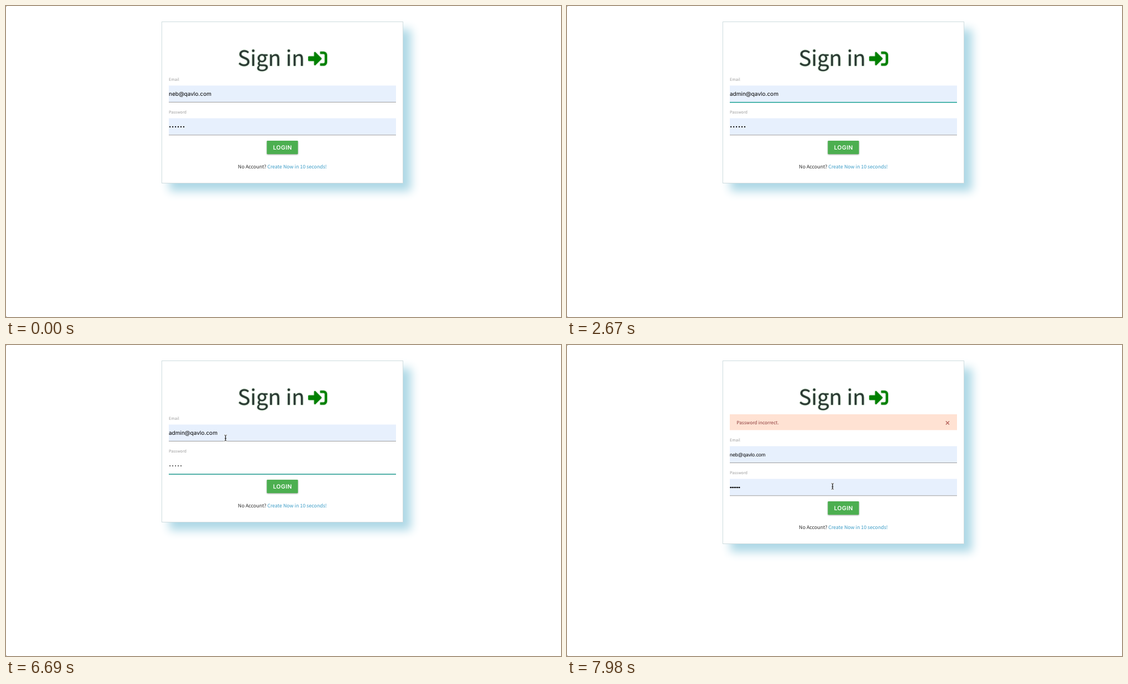
These frames come from a looping animation (999 by 561 pixels, 8 s). An HTML page:

```html
<!DOCTYPE html>
<html lang="en">
<head>
<meta charset="utf-8">
<title>Sign in</title>
<style>
  html, body { margin: 0; width: 100%; height: 100%; overflow: hidden; background: #fff; }
  #card {
    position: absolute; left: 280px; top: 28px; width: 435px; height: 292px;
    box-sizing: border-box; border: 1px solid #cfdcdf; background: #fff;
    box-shadow: 13.5px 13.5px 16px lightblue;
  }
  svg { position: absolute; left: 0; top: 0; display: block; }
  text {
    font-family: "Noto Sans CJK JP", "Noto Sans CJK SC", "Noto Sans CJK", "Open Sans", sans-serif;
    text-rendering: geometricPrecision;
  }
  .ui { font-family: Inter, Roboto, sans-serif; font-size: 8.5px; }
  .title { filter: drop-shadow(.8px .8px .9px rgba(0, 110, 0, .5)); }
  .label { font-size: 7.15px; fill: #9e9e9e; }
  .value { font-family: Inter, Roboto, sans-serif; font-size: 10.03px; }
  .value.plain { font-family: "Liberation Sans", Arial, sans-serif; font-size: 8.87px; }
  .foot { font-size: 8.8px; fill: #2b2b2b; }
  .panel { filter: drop-shadow(0 .7px 1.3px rgba(0, 0, 0, .38)); }
  .grey { fill: #5f6368; }
</style>
</head>
<body>
<div id="card"></div>
<svg width="999" height="561" viewBox="0 0 999 561">
  <path d="M0 0h1v1h-1zM0 560h1v1h-1z" fill="#777"/>

  <g class="title">
    <text x="477.3" y="108" font-size="38.2" text-anchor="middle" fill="#2a3733">Sign in</text>
    <g transform="translate(544 78) scale(.0664)">
      <path d="M324 96h92a64 64 0 0 1 64 64v192a64 64 0 0 1-64 64h-92" fill="none" stroke="green" stroke-width="64"/>
      <path d="M20 212H180V95L342 256L180 417V300H20Z" fill="green" stroke="green" stroke-width="40" stroke-linejoin="round"/>
    </g>
  </g>

  <g id="alert">
    <rect x="293" y="125" width="409" height="28.5" fill="#ffe2d3"/>
    <text x="305.3" y="143" font-size="8.3" fill="#8c3a3a">Password incorrect.</text>
    <path d="M682 137.500l6 6m0-6l-6 6" stroke="#b8665e" stroke-width="1.5"/>
  </g>

  <g id="form">
    <text class="label" x="293" y="135">Email</text>
    <rect id="mailBox" x="293" y="143.5" width="409" height="30"/>
    <rect id="mailSel" y="152" height="12.500" fill="#a9d2f8"/>
    <text id="mail" class="value" x="293" y="162"></text>
    <rect id="mailCaret" y="152.500" width=".8" height="12" fill="#333"/>
    <rect id="mailLine" x="293" y="173" width="409"/>

    <text class="label" x="293" y="194">Password</text>
    <rect id="passBox" x="293" y="202.5" width="409" height="30"/>
    <rect id="passSel" x="293" y="211.500" width="29.700" height="12.500" fill="#a9d2f8"/>
    <g id="dots"></g>
    <rect id="passCaret" y="211.500" width=".8" height="12" fill="#333"/>
    <rect id="passLine" x="293" y="232.300" width="409"/>

    <rect id="button" x="469.5" y="243" width="56" height="24.300" rx="1.3" fill="#4caf50"/>
    <text class="ui" x="497.700" y="259" text-anchor="middle" style="font-size:10.4px;font-weight:600;letter-spacing:.4px" fill="#fff">LOGIN</text>
    <text class="foot" x="497.500" y="293" text-anchor="middle">No Account? <tspan fill="#3a9bc6">Create Now in 10 seconds!</tspan></text>
  </g>

  <g id="saved">
    <path class="panel" d="M361 180H368L373 175.500L378 180H580a2 2 0 0 1 2 2V276a2 2 0 0 1-2 2H361a2 2 0 0 1-2-2V182a2 2 0 0 1 2-2Z" fill="#fff"/>
    <circle class="grey" cx="372" cy="202" r="4.500"/>
    <path d="M369 200.500q2-2.500 3-1.500t-1 3q2 1 1 3.200q-3-1.200-3-4.700M373.500 199.500l1.700 1.500-.6 2.500-1.600-1.200z" fill="#fff"/>
    <text class="ui" x="385" y="198">neb@qavlo.com</text>
    <g id="savedDots"></g>
    <circle cx="372" cy="233.500" r="5.300" fill="#4285f4"/>
    <text class="ui grey" x="385" y="236.700">Use passwords saved in your Zavlio Account</text>
    <path d="M359 248.500H582" stroke="#dcdcdc"/>
    <circle class="grey" cx="372" cy="263.500" r="4.600"/>
    <text class="ui grey" x="385" y="266.700">Manage Passwords...</text>
    <circle cx="567.500" cy="263.500" r="3.600" fill="#4583b5"/>
  </g>

  <g id="hint">
    <path class="panel" d="M361 180H368L373 175.500L378 180H460.500a2 2 0 0 1 2 2V207.500a2 2 0 0 1-2 2H361a2 2 0 0 1-2-2V182a2 2 0 0 1 2-2Z" fill="#fff"/>
    <rect id="hintRow" x="359" y="185" width="103.500" height="19.500" fill="#e6e6e6"/>
    <text class="ui" x="366.700" y="198">admin@qavlo.com</text>
  </g>

  <g id="cursor">
    <g id="beam" fill="none" stroke-linecap="square">
      <path d="M-1.700-5.300Q0-5.300 0-4V4Q0 5.300-1.700 5.300M1.700-5.300Q0-5.300 0-4V4Q0 5.300 1.700 5.300" stroke="#fff" stroke-width="2"/>
      <path d="M-1.700-5.300Q0-5.300 0-4V4Q0 5.300-1.700 5.300M1.700-5.300Q0-5.300 0-4V4Q0 5.300 1.700 5.300M-1 .8H1" stroke="#222" stroke-width=".9"/>
    </g>
    <path id="hand" d="M-1.600 1V-4.600a1 1 0 0 1 2 0V-1.200l3 .6q1.200.3 1 1.600L3.800 4.200V5.600H-1.400V4.300L-4.200 1q-.4-1.200.9-1Z" fill="#fff" stroke="#222" stroke-width=".9" stroke-linejoin="round"/>
    <path id="arrow" d="M0 0V10.500L2.500 8.300L4.100 12L5.800 11.300L4.200 7.700H7.500Z" fill="#111" stroke="#fff" stroke-width=".8"/>
  </g>
</svg>
<script>
const $ = id => document.getElementById(id);
const LOOP = 8000, TICK = 30, LEFT = 293, PITCH = 4.95;
const USER = "neb@qavlo.com", ADMIN = "admin@qavlo.com";

const mailSteps = [[0, USER], [1170, "a"], [1380, "ad"], [1620, "adm"],
  [1860, "admi"], [2100, "admin"], [2370, ADMIN], [7680, USER]];
const dotSteps = [[0, 6], [3060, 1], [3270, 2], [3420, 3], [3600, 4], [3780, 5],
  [4410, 6], [4620, 7], [4800, 8], [5460, 0], [5580, 1], [5730, 2],
  [5850, 3], [6000, 4], [6180, 5], [7680, 6]];
const caretSteps = [[0, 0], [3060, 1], [4230, 0], [4410, 1], [5250, 0],
  [5460, 1], [6630, 0], [7080, 1], [7350, 0]];
const approach = [[90, 455, 572], [180, 446, 470], [300, 426, 300], [420, 405, 192],
  [540, 394, 149], [600, 392, 143], [690, 392, 153], [1170, 392, 153]];
const toButton = [[6630, 392, 161], [6780, 400, 178], [6960, 440, 225], [7110, 485, 260],
  [7200, 503, 268], [7290, 504, 260], [7680, 504, 260], [7800, 495, 258],
  [7950, 478, 255], [8000, 478, 255]];

const valueAt = (steps, t) => steps.findLast(s => s[0] <= t)[1];
const within = (t, a, b) => t >= a && t < b;
const ramp = (t, a, b) => Math.min(1, Math.max(0, (t - a) / (b - a)));
const show = (id, on) => { $(id).style.display = on ? "" : "none"; };
const set = (id, attrs) => { for (const k in attrs) $(id).setAttribute(k, attrs[k]); };

function pointAt(path, t) {
  const i = path.findIndex(p => p[0] > t);
  if (i < 1) return null;
  const [a, b] = [path[i - 1], path[i]], k = (t - a[0]) / (b[0] - a[0]);
  return [a[1] + (b[1] - a[1]) * k, a[2] + (b[2] - a[2]) * k];
}

function drawDots(id, n, x, y, pitch, r, fill) {
  let out = "";
  for (let i = 0; i < n; i++) out += `<circle cx="${x + i * pitch}" cy="${y}" r="${r}" fill="${fill}"/>`;
  $(id).innerHTML = out;
}

function drawLine(id, k, active) {
  const rest = [158, 158, 158];
  const rgb = rest.map((v, i) => Math.round(v + (active[i] - v) * k));
  set(id, { fill: `rgb(${rgb})`, height: 1 + .6 * k });
}

function drawCursor(t, shift) {
  const p = pointAt(approach, t) || pointAt(toButton, t);
  show("cursor", p);
  if (!p) return false;
  const [x, y] = p, fy = y - shift;
  const over = (x0, x1, y0, y1) => within(x, x0, x1) && within(fy, y0, y1);
  const hand = over(469, 526, 243, 268) || over(470, 578, 284, 296);
  const beam = !hand && (over(293, 702, 140, 174) || over(293, 702, 202, 233));
  show("hand", hand);
  show("beam", beam);
  show("arrow", !hand && !beam);
  set("cursor", { transform: `translate(${x} ${y})` });
  return hand && over(469, 526, 243, 268);
}

function render(time) {
  const t = Math.floor(time / TICK) * TICK;
  const failed = t >= 7680, shift = failed ? 39 : 0;
  show("alert", failed);
  set("form", { transform: `translate(0 ${shift})` });
  $("card").style.height = 292 + shift + "px";

  // email
  const typing = within(t, 1170, 2370), mail = $("mail");
  mail.textContent = valueAt(mailSteps, t);
  mail.setAttribute("class", failed ? "value plain" : "value");
  set("mail", { fill: typing ? "#3a3a3a" : "#000" });
  set("mailBox", { fill: typing ? "#fff" : "#e7f0fd" });
  const end = mail.getComputedTextLength();
  const selected = within(t, 870, 1170);
  show("mailSel", selected);
  if (selected) {
    const from = t < 1020 ? mail.getSubStringLength(0, USER.length - 3) : 0;
    set("mailSel", { x: LEFT + from, width: end - from });
  }
  show("mailCaret", within(t, 690, 870) || typing);
  set("mailCaret", { x: LEFT + end });
  drawLine("mailLine", ramp(t, 660, 900) - ramp(t, 2700, 3000), t < 1170 ? [62, 163, 196] : [38, 166, 154]);

  // password
  const n = valueAt(dotSteps, t), retyped = within(t, 3060, 7680);
  set("passBox", { fill: retyped ? "#fff" : "#e7f0fd" });
  show("passSel", within(t, 2700, 3060));
  if (failed) drawDots("dots", n, 294.6, 218, 3.11, 1.35, "#000");
  else drawDots("dots", n, 295.2, 218, PITCH, retyped ? 1 : 1.15, retyped ? "#333" : "#000");
  show("passCaret", valueAt(caretSteps, t));
  set("passCaret", { x: LEFT - .4 + n * PITCH });
  drawLine("passLine", ramp(t, 2700, 3000) - ramp(t, 7290, 7650), [42, 158, 148]);

  // popups
  show("saved", within(t, 720, 1170));
  show("hint", within(t, 1200, 2550));
  show("hintRow", t >= 2370);

  const hover = drawCursor(t, shift);
  $("button").style.filter = hover
    ? "drop-shadow(0 1.5px 1.6px rgba(0,0,0,.4))"
    : "drop-shadow(0 1px 1.1px rgba(0,0,0,.35))";
}

drawDots("savedDots", 6, 387.6, 210.3, 4.25, .85, "#5f6368");
const start = performance.now();
function frame() {
  render((performance.now() - start) % LOOP);
  requestAnimationFrame(frame);
}
frame();
</script>
</body>
</html>
```
